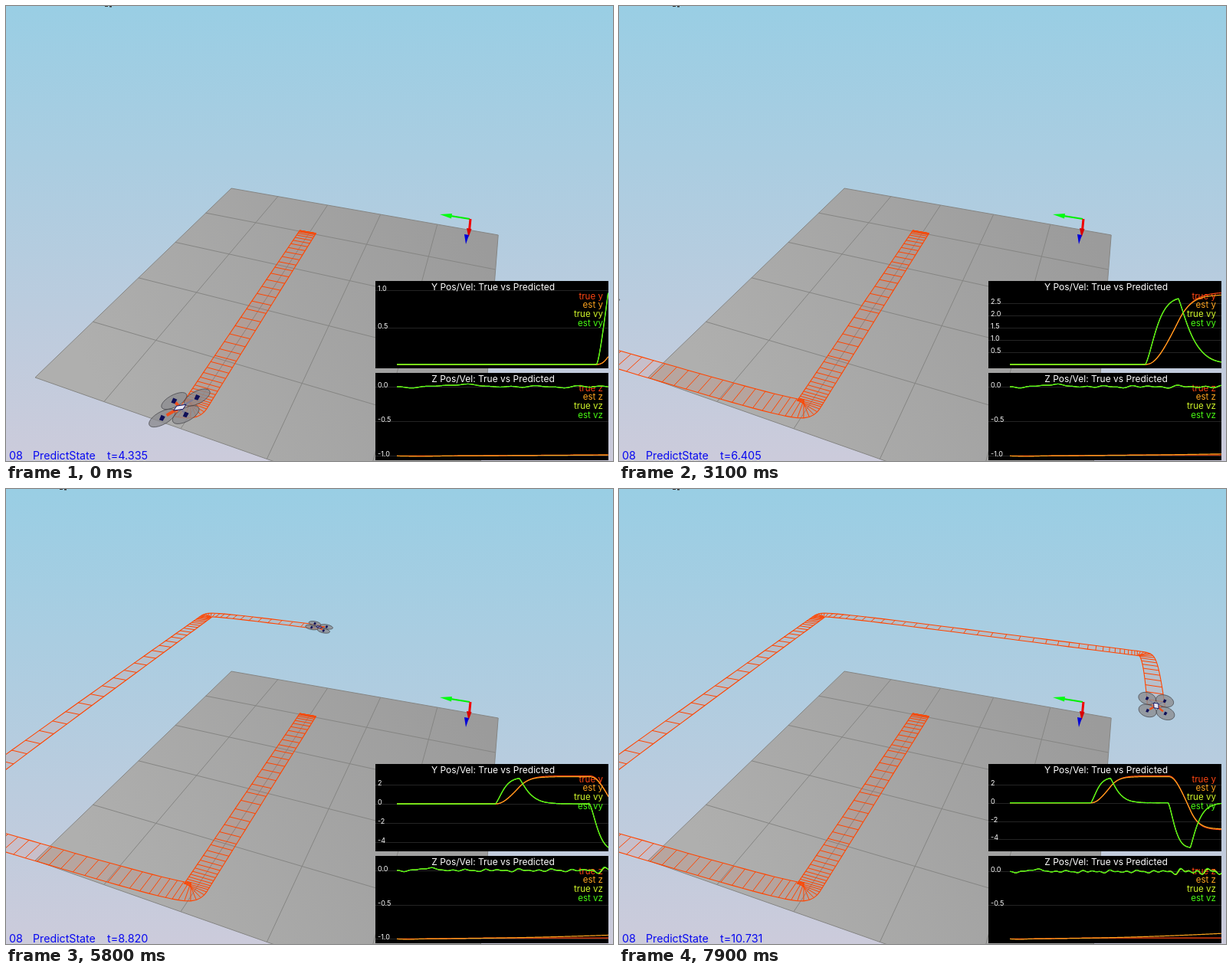
These frames come from a looping animation (792 px wide and 594 px high, 8000 ms). An HTML page with a canvas:

```html
<!DOCTYPE html>
<html lang="en">
<head>
<meta charset="utf-8">
<title>Predict state</title>
<style>
html, body { margin: 0; width: 100%; height: 100%; overflow: hidden; background: #b2ccdf; }
canvas { display: block; }
</style>
</head>
<body>
<canvas id="stage" width="792" height="594"></canvas>
<script>
const ctx = document.getElementById('stage').getContext('2d');
const LOOP = 8000, STEP = 100;
const FONT = 'Inter, "Open Sans", sans-serif';
const COLORS = ['#ff4512', '#ffa51e', '#d0f52a', '#48f814'];
const TRAIL = '#ff4500', LABEL = '#0808f0';
const DT = .01, RUNG = .05, ARM = .112;

// Loop time to simulation time; the simulator runs on while the picture holds
const CLOCK = [[0, 4.335], [800, 4.84], [2400, 5.86], [3100, 6.405],
  [4900, 7.96], [5800, 8.82], [7300, 10.16], [7900, 10.731]];

// Each leg is flown straight, after a quarter turn to the right
const LEGS = [
  { from: 2.1, to: 3.1, axis: 'x', dist: -3.63 },
  { from: 4.09, to: 5.1, axis: 'y', dist: 2.95 },
  { from: 6, to: 7.05, axis: 'x', dist: 7.1 },
  { from: 8.02, to: 9.15, axis: 'y', dist: -5.9 },
  { from: 10.08, to: 11.1, axis: 'x', dist: -7.1 }
];

const ramp = (t, a, b) => Math.max(0, Math.min(1, (t - a) / (b - a)));
const smooth = u => u * u * (3 - 2 * u);
const bump = (t, c, w) => Math.exp(-(((t - c) / w) ** 2));

function simTime(ms) {
  if (ms > 2400 && ms < 3100) ms = 2400;
  const i = CLOCK.findIndex((k, n) => n && ms <= k[0]);
  const [a, b] = [CLOCK[i - 1], CLOCK[i]];
  return a[1] + (b[1] - a[1]) * ramp(ms, a[0], b[0]);
}

// Speed up towards full speed, then brake
function speed(leg, t) {
  const s = t - leg.from;
  if (s <= 0) return 0;
  const brake = Math.max(0, t - leg.to);
  return (1 - Math.exp(-((s / .42) ** 1.5))) * Math.exp(-((brake / .47) ** 1.2));
}
for (const leg of LEGS) {
  let area = 0;
  for (let t = leg.from; t < leg.to + 3; t += DT) area += speed(leg, t) * DT;
  leg.peak = leg.dist / area;
}

function climb(t, phase) {
  const amp = .007 + .01 * ramp(t, 1, 4) + .02 * ramp(t, 7.8, 8.6);
  const wave = Math.sin(5.1 * t + phase) + Math.sin(8.7 * t + 1 + phase) + Math.sin(14 * t);
  return .03 * bump(t, 1.3, .5) - .02 * bump(t, .25, .2) + amp * wave / 2;
}

const samples = [];
const pos = { x: 3.63, y: 0 };
for (let t = 0; t < 10.9; t += DT) {
  const vel = { x: 0, y: 0 };
  for (const leg of LEGS) vel[leg.axis] += leg.peak * speed(leg, t);
  pos.x += vel.x * DT;
  pos.y += vel.y * DT;
  samples.push({
    t, x: pos.x, y: pos.y, vx: vel.x, vy: vel.y,
    Y: [pos.y, pos.y * (1 - .03 * ramp(t, 5.2, 6.2)), vel.y,
      vel.y + .012 * Math.sin(9 * t) * ramp(t, 4, 5)],
    Z: [-1 + .014 * ramp(t, 1, 4), -1 + .0007 * t * t - .008 * bump(t, .5, .4),
      climb(t, 0), climb(t, .5 * ramp(t, 3, 9))]
  });
}

function state(t) {
  const k = t / DT, i = Math.min(samples.length - 2, Math.floor(k));
  const a = samples[i], b = samples[i + 1], mix = key => a[key] + (b[key] - a[key]) * (k - i);
  const turns = LEGS.slice(1).reduce((n, leg) => n + smooth(ramp(t, leg.from - .15, leg.from + .25)), 0);
  const yaw = turns * Math.PI / 2;
  const ahead = [-Math.cos(yaw), Math.sin(yaw)], right = [Math.sin(yaw), Math.cos(yaw)];
  const accel = ((b.vx - a.vx) * ahead[0] + (b.vy - a.vy) * ahead[1]) / DT;
  const pitch = Math.max(-.6, Math.min(.6, accel * .11));
  return { x: mix('x'), y: mix('y'), ahead, right, pitch };
}

// Perspective view of the flight plane, h above it
function project(x, y, h = 0) {
  const w = 1 + .1563 * x + .062 * y;
  return [(239 + 104.2 * x - 123.5 * y) / w, (533 - 19.5 * x - 8.06 * y - 115 * h) / w];
}

// Screen place of a point on the drone
function onBody(s, f, r) {
  return project(s.x + f * s.ahead[0] + r * s.right[0],
    s.y + f * s.ahead[1] + r * s.right[1], -f * s.pitch);
}

function trace(points, close) {
  ctx.beginPath();
  points.forEach(([x, y], i) => i ? ctx.lineTo(x, y) : ctx.moveTo(x, y));
  if (close) ctx.closePath();
}
function line(color, width, ...points) {
  trace(points);
  ctx.strokeStyle = color;
  ctx.lineWidth = width;
  ctx.stroke();
}
function shape(color, ...points) {
  trace(points, true);
  ctx.fillStyle = color;
  ctx.fill();
}
function text(str, x, y, size, color, align = 'left') {
  ctx.font = `400 ${size}px ${FONT}`;
  ctx.textAlign = align;
  ctx.fillStyle = color;
  ctx.fillText(str, x, y);
}

// Corner of floor tile, row i towards the viewer, column j
function tile(i, j) {
  const w = 1 - .0309 * j - .0803 * i;
  return [(294 + 49.8 * j - 54.25 * i) / w, (238 + 2.96 * j + 10.45 * i) / w];
}

function scene() {
  const sky = ctx.createLinearGradient(0, 0, 0, 594);
  sky.addColorStop(0, '#99cee4');
  sky.addColorStop(1, '#cccbdb');
  ctx.fillStyle = sky;
  ctx.fillRect(0, 0, 792, 594);

  const floor = ctx.createLinearGradient(120, 500, 600, 260);
  floor.addColorStop(0, '#afafae');
  floor.addColorStop(1, '#9b9b9b');
  shape(floor, tile(0, 0), tile(0, 5), tile(5, 5), tile(5, 0));
  for (let i = 0; i < 6; i++) {
    line('#858583', 1, tile(i, 0), tile(i, 5));
    line('#858583', 1, tile(0, i), tile(5, i));
  }

  line('#00f000', 2, [605, 278], [580, 274]);
  shape('#00ff10', [566, 272], [582, 271], [581, 277.5]);
  line('#f00000', 3, [606, 278], [604.5, 293]);
  shape('#d80000', [601, 290], [607.5, 291], [603.5, 302]);
  shape('#0000d8', [598, 298], [604, 299], [600, 311]);
}

function ribbon(end) {
  const inner = [], outer = [];
  const add = t => {
    const s = state(t);
    inner.push(onBody(s, 0, ARM));
    outer.push(onBody(s, 0, -ARM));
  };
  for (let t = 2; t < end; t += RUNG) add(t);
  add(end);
  shape('rgba(255,80,30,.1)', ...inner, ...outer.slice().reverse());
  line(TRAIL, 1.1, ...inner);
  line(TRAIL, 1.1, ...outer);
  inner.forEach((p, i) => line(TRAIL, 1, p, outer[i]));
}

function drone(t) {
  const s = state(t), hub = onBody(s, 0, 0);
  const size = 1 / (1 + .1563 * s.x + .062 * s.y);
  const arms = [[1, 1], [1, -1], [-1, 1], [-1, -1]].map(([f, r]) => [f * ARM, r * ARM]);
  for (const [f, r] of arms) {
    const rim = [];
    for (let a = 0; a < 2 * Math.PI; a += Math.PI / 12)
      rim.push(onBody(s, f + ARM * Math.cos(a), r + ARM * Math.sin(a)));
    shape('rgba(140,140,144,.78)', ...rim);
    line('rgba(60,60,64,.85)', .8, ...rim, rim[0]);
  }
  for (const [f, r] of arms) {
    const front = f > 0, [x, y] = onBody(s, f, r), m = 4 * size;
    line(front ? '#f0501c' : '#7c7c98', (front ? 4 : 2) * size, hub, onBody(s, f * .75, r * .75));
    shape('#101058', [x - m, y + m * .6], [x - m * .3, y - m], [x + m, y - m * .4], [x + m * .2, y + m]);
  }
  const deck = [[1, 1], [1, -1], [-1, -1], [-1, 1]].map(([f, r]) => onBody(s, f * .045, r * .03));
  shape('#e8e8f4', ...deck);
  line('#101060', 1, ...deck, deck[0]);
}

function panel(name, top, t, map, ticks, digits) {
  const key = name.toLowerCase();
  ctx.save();
  ctx.beginPath();
  ctx.rect(482, top, 304, 114);
  ctx.clip();
  ctx.fillStyle = '#000';
  ctx.fillRect(482, top, 304, 114);
  for (const v of ticks) {
    const y = Math.round(map(v)) + .5;
    line('#242424', 1, [482, y], [786, y]);
    text(v.toFixed(digits), 485, y, 9, '#fff');
  }
  text(`${name} Pos/Vel: True vs Predicted`, 635.5, top + 12, 12, '#fff', 'center');
  ['true ' + key, 'est ' + key, 'true v' + key, 'est v' + key].forEach((s, i) =>
    text(s, 779, top + 23.5 + i * 11.8, 11.6, COLORS[i], 'right'));
  const shown = samples.filter(s => s.t <= t);
  COLORS.forEach((c, i) =>
    line(c, 1.2, ...shown.map(s => [510 + 276 * s.t / t, map(s[name][i])])));
  ctx.restore();
}

function plots(t) {
  const values = samples.filter(s => s.t <= t).flatMap(s => s.Y);
  const lo = Math.min(...values), hi = Math.max(...values), range = hi - lo;
  const step = range < 3.5 ? .5 : range < 7 ? 1 : 2;
  const ticks = [];
  for (let n = Math.ceil(lo / step); n * step <= hi + .06; n++)
    if (n || step > .5) ticks.push(n * step + 0);
  panel('Y', 359, t, v => 468 - (v - lo) / range * 93.5, ticks, step < 1 ? 1 : 0);

  const zero = 497 + 2.4 * ramp(t, 8.2, 10);
  panel('Z', 479, t, v => zero - v * (587.3 - zero), t < 9.3 ? [0, -.5, -1] : [0, -.5], 1);
}

function draw(now) {
  const ms = Math.floor(now % LOOP / STEP) * STEP, t = simTime(ms);
  scene();

  ctx.fillStyle = '#333';
  const mark = ms < 1400 ? 129 : 70;
  ctx.fillRect(mark, 0, 4, 1);
  ctx.fillRect(mark + 6, 0, 3, 1.5);

  ribbon(t);
  drone(t);
  plots(t);

  text('08', 4, 591.5, 14.4, LABEL);
  text('PredictState', 35, 591.5, 14.2, LABEL);
  text('t=' + t.toFixed(3), 132, 591.5, 14.4, LABEL);
}

function tick() {
  draw(performance.now());
  requestAnimationFrame(tick);
}
tick();
</script>
</body>
</html>
```
